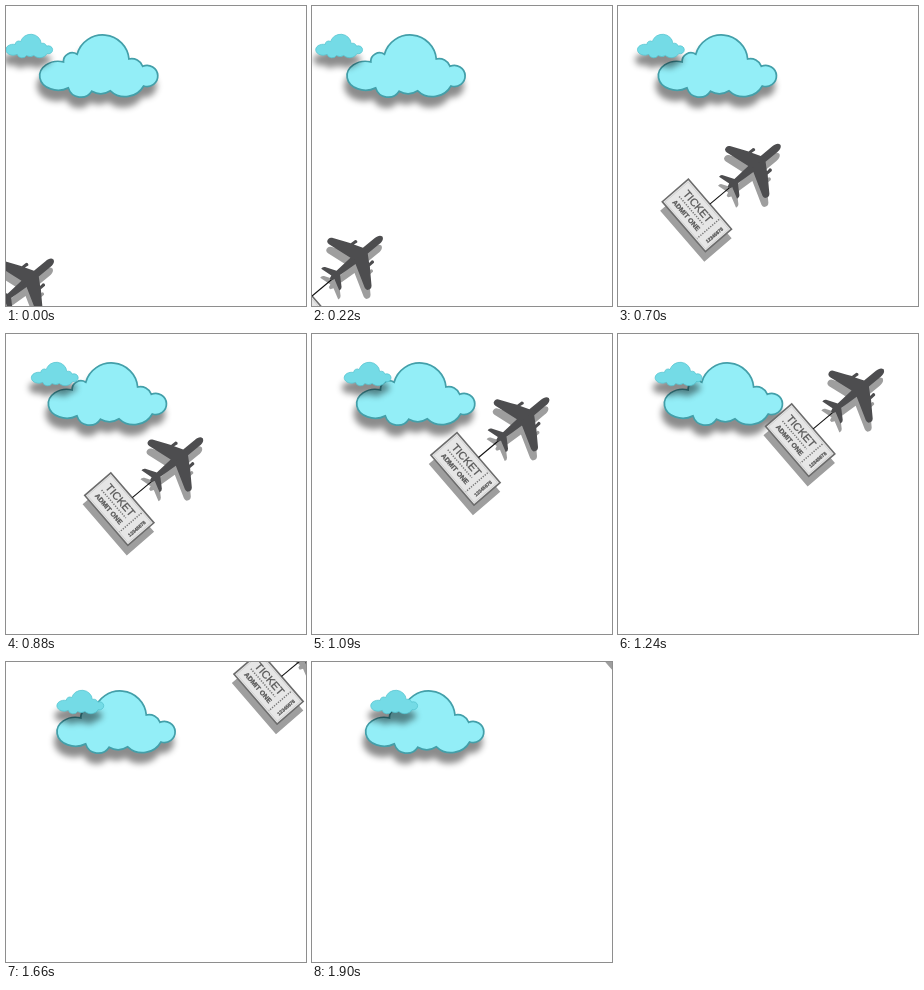
Recreate the animation shown at these times as an HTML page. Size 300 px wide and 300 px high, loop 1930 ms.

```html
<!DOCTYPE html>
<html lang="en">
<head>
<meta charset="utf-8">
<title>Plane towing a ticket</title>
<style>
  html, body { margin: 0; height: 100%; overflow: hidden; background: #fff; }
  svg { display: block; width: 100vw; height: 100vh; }
  text { font-family: "Liberation Sans", Arial, sans-serif; fill: #555; stroke: #555; stroke-width: .25; }
  .soft { filter: drop-shadow(-2px 10px 3px rgba(0, 0, 0, .45)); }
  .hard { filter: drop-shadow(-1px 9.5px .4px rgba(0, 0, 0, .38)); }
</style>
</head>
<body>
<svg viewBox="0 0 300 300">
  <defs>
    <path id="cloud" d="M57 55A19 15 0 1 0 62 82A13.3 13.3 0 0 0 86 85.5A18 18 0 0 0 105 85
      A21.6 21.6 0 0 0 139 80A11 11 0 1 0 138 59.5A12 12 0 0 0 124 52A27 27 0 0 0 71 47A9 9 0 0 0 57 55Z"/>
    <!-- half of the plane, nose to the right -->
    <path id="half" d="M33 0C33 2.5 30 3.8 26 3.8H11L6 12L10 11.5Q12 13 10 14.8L4.5 15L1 20L-6.500 31
      Q-9 34 -12.500 31.500Q-13.500 30 -13 28L-5 4L-24 2.8L-30.500 13Q-32 15 -34.500 14.200L-31 2.500L-34 1.2V-.5H33Z"/>
  </defs>

  <g id="big" class="soft">
    <use href="#cloud" transform="translate(1.7 3) scale(.978 .962)" fill="#93eef7" stroke="#439fa9" stroke-width="1.8"/>
  </g>
  <g id="small" class="soft">
    <use href="#cloud" transform="translate(-12.9 18.4) scale(.388 .365)" fill="#74dbe6" stroke="#55c3cf" stroke-width="2"/>
  </g>

  <g id="tow">
    <g class="hard">
      <g transform="translate(145 98.6) rotate(49.2)">
        <rect width="66" height="34.5" fill="#e6e6e6" stroke="#6c6c6c" stroke-width="1.6"/>
        <rect x="2" y="2" width="62" height="30.500" fill="none" stroke="#ccc" stroke-width=".7"/>
        <text x="7.5" y="14.4" font-size="10.9">TICKET</text>
        <text x="7" y="27.6" font-size="6.8" font-weight="bold">ADMIT ONE</text>
        <text transform="translate(61 27.5) rotate(-90)" font-size="4.8" font-weight="bold">12345678</text>
        <path d="M7 18.2H44M50.500 3V32" stroke="#777" stroke-width="1.5" stroke-dasharray="1.3 1.3"/>
      </g>
    </g>
    <path d="M166.500 123.500L188 105.500" stroke="#111" stroke-width="1.1"/>
    <g class="hard">
      <g transform="translate(211.3 85.2) rotate(-39.5)" fill="#4d4d4f">
        <use href="#half"/>
        <use href="#half" transform="scale(1 -1)"/>
      </g>
    </g>
  </g>
</svg>
<script>
  const LOOP = 1930, HOLD = 130, STEP = 30;
  const move = (id, x, y = 0) =>
    document.getElementById(id).setAttribute("transform", `translate(${x} ${y})`);

  function draw() {
    const t = performance.now() % LOOP;
    const k = t < HOLD ? 0 : Math.floor((t - HOLD) / STEP) + 1;
    const d = 5.74 * (k - 33);
    move("big", k / 3);
    move("small", k * .983);
    move("tow", d, -d);
    requestAnimationFrame(draw);
  }
  draw();
</script>
</body>
</html>
```
